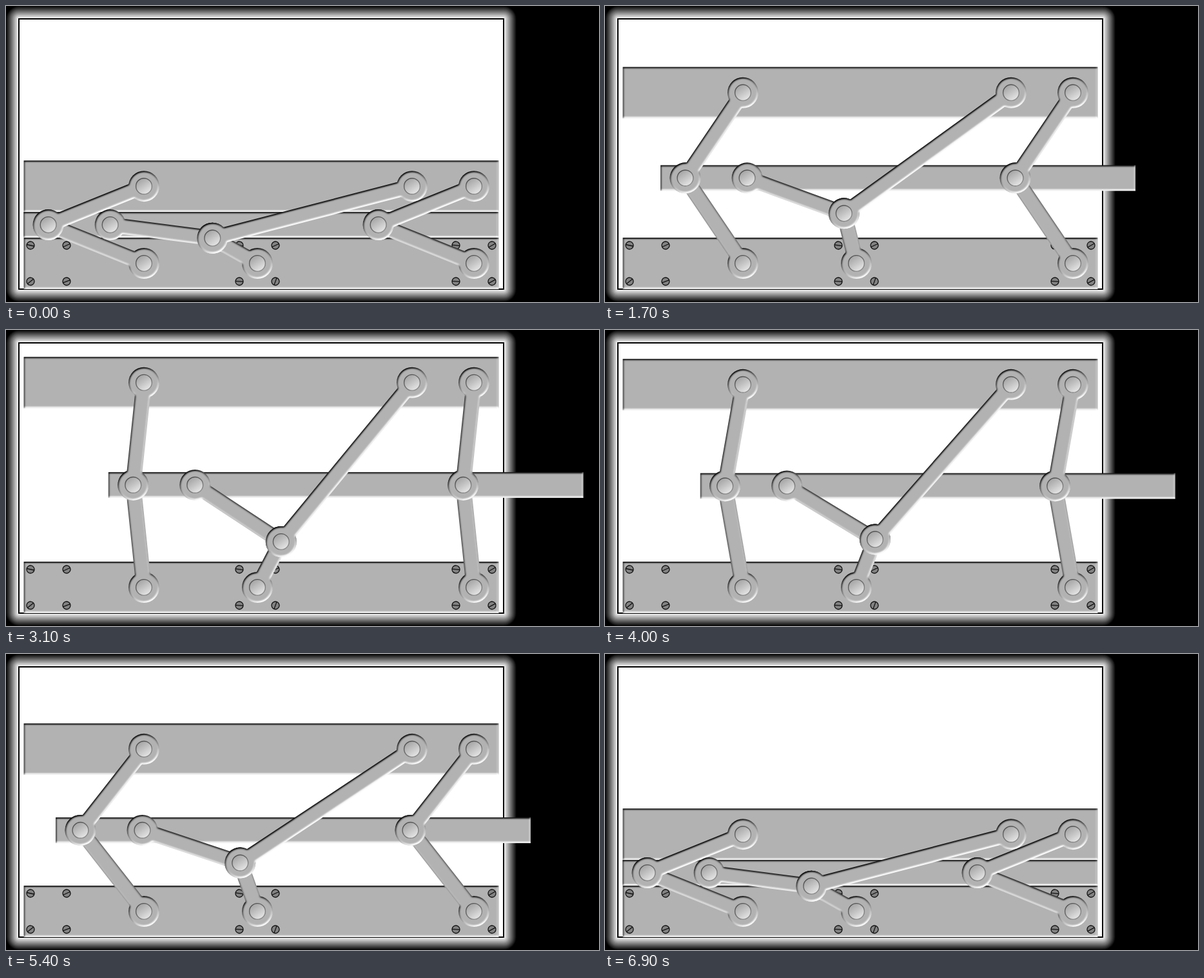
Animation of 920x460 px, one loop 7000 ms. Source, as an HTML page:

```html
<!DOCTYPE html>
<html lang="en">
<head>
<meta charset="utf-8">
<title>Parallel bar linkage</title>
<style>
  html, body { margin: 0; width: 100%; height: 100%; overflow: hidden; background: #000; }
  svg { display: block; width: 920px; height: 460px; }
</style>
</head>
<body>
<svg id="stage" viewBox="0 0 920 460" xmlns="http://www.w3.org/2000/svg">
  <defs>
    <filter id="bevel" x="-10%" y="-20%" width="120%" height="140%" color-interpolation-filters="sRGB">
      <feGaussianBlur in="SourceAlpha" stdDeviation="1.5" result="height"/>
      <feDiffuseLighting in="height" surfaceScale="1.9" diffuseConstant="0.987" lighting-color="#fff" result="lit">
        <feDistantLight azimuth="65" elevation="45"/>
      </feDiffuseLighting>
      <feComposite in="lit" in2="SourceAlpha" operator="in"/>
    </filter>
    <linearGradient id="rivetFill" x1="0.2" y1="0.05" x2="0.8" y2="0.95">
      <stop offset="0" stop-color="#a2a2a2"/>
      <stop offset="0.5" stop-color="#c4c4c4"/>
      <stop offset="1" stop-color="#e8e8e8"/>
    </linearGradient>
    <linearGradient id="rivetRim" x1="0.2" y1="0.05" x2="0.8" y2="0.95">
      <stop offset="0" stop-color="#4c4c4c"/>
      <stop offset="1" stop-color="#8e8e8e"/>
    </linearGradient>
  </defs>
</svg>
<script>
const stage = document.getElementById('stage');

function add(tag, attrs, parent = stage) {
  const el = document.createElementNS('http://www.w3.org/2000/svg', tag);
  set(el, attrs);
  parent.appendChild(el);
  return el;
}
function set(el, attrs) {
  for (const key in attrs) el.setAttribute(key, attrs[key]);
}

// Glowing frame
const frame = { x: 20, y: 20, width: 752, height: 420 };
for (let i = 20; i > 0; i--) {
  const v = Math.round(255 * (20.5 - i) / 20);
  add('rect', { ...frame, fill: 'none', stroke: `rgb(${v},${v},${v})`,
    'stroke-width': 2 * i, 'stroke-linejoin': 'round' });
}
add('rect', { ...frame, fill: '#fff', stroke: '#000', 'stroke-width': 2 });

// Plates
const plate = (y, height) =>
  add('rect', { x: 27.5, y, width: 737, height, fill: '#b2b2b2', filter: 'url(#bevel)' });
plate(360, 80);
const topPlate = plate(240, 80);
const midPlate = plate(320, 40);

// Screws: upper and lower slot angle for each column
const screws = [[38, 12, -40], [94, -25, -20], [362, 8, 4],
                [418, -25, -70], [698, 6, 4], [754, -30, -28]];
for (const [x, upper, lower] of screws) {
  [[372, upper], [428, lower]].forEach(([y, angle]) => {
    const g = add('g', { transform: `translate(${x} ${y}) rotate(${angle})`,
      stroke: '#111', 'stroke-width': 1.3 });
    add('circle', { r: 6, fill: '#828282' }, g);
    add('line', { x1: -6, x2: 6 }, g);
  });
}

function makeArm() {
  const body = add('g', { filter: 'url(#bevel)' });
  const shaft = add('line', { stroke: '#b2b2b2', 'stroke-width': 24 }, body);
  const discs = [0, 1].map(() => add('circle', { r: 24, fill: '#b2b2b2' }, body));
  const rivets = [0, 1].map(() => add('circle', { r: 12.4, fill: 'url(#rivetFill)',
    stroke: 'url(#rivetRim)', 'stroke-width': 1.4 }));
  return (a, b) => {
    set(shaft, { x1: a.x, y1: a.y, x2: b.x, y2: b.y });
    [a, b].forEach((p, i) => {
      set(discs[i], { cx: p.x, cy: p.y });
      set(rivets[i], { cx: p.x, cy: p.y });
    });
  };
}

const lowerLeft = makeArm(), lowerRight = makeArm();
const upperLeft = makeArm(), upperRight = makeArm();
const shortArm = makeArm(), midArm = makeArm(), longArm = makeArm();

const SIDE = 160;
const point = (x, y) => ({ x, y });

// Point at distance ra from a and rb from b, on the upper side of a-b
function joint(a, ra, b, rb) {
  const dx = b.x - a.x, dy = b.y - a.y, d = Math.hypot(dx, dy);
  const along = (ra * ra - rb * rb + d * d) / (2 * d);
  const off = Math.sqrt(Math.max(0, ra * ra - along * along));
  return point(a.x + (along * dx + off * dy) / d, a.y + (along * dy - off * dx) / d);
}

function pose(step) {
  const angle = (22 + 2 * step) * Math.PI / 180;
  const rise = SIDE * Math.sin(angle);
  const midX = 214 - SIDE * Math.cos(angle);
  const midY = 400 - rise, topY = 400 - 2 * rise;

  set(topPlate, { y: topY - 40 });
  set(midPlate, { x: midX - 38.5, y: midY - 20 });

  const left = point(midX, midY), right = point(midX + 512, midY);
  lowerLeft(left, point(214, 400));
  lowerRight(right, point(726, 400));
  upperLeft(left, point(214, topY));
  upperRight(right, point(726, topY));

  const anchor = point(390, 400), slider = point(midX + 96, midY);
  const hub = joint(slider, 160, anchor, 80);
  shortArm(hub, anchor);
  midArm(slider, hub);
  longArm(hub, point(630, topY));
}

let shown = -1;
function tick() {
  const n = Math.floor(performance.now() / 100) % 70;
  const step = Math.min(n, 69 - n);
  if (step !== shown) pose(shown = step);
  requestAnimationFrame(tick);
}
tick();
</script>
</body>
</html>
```
